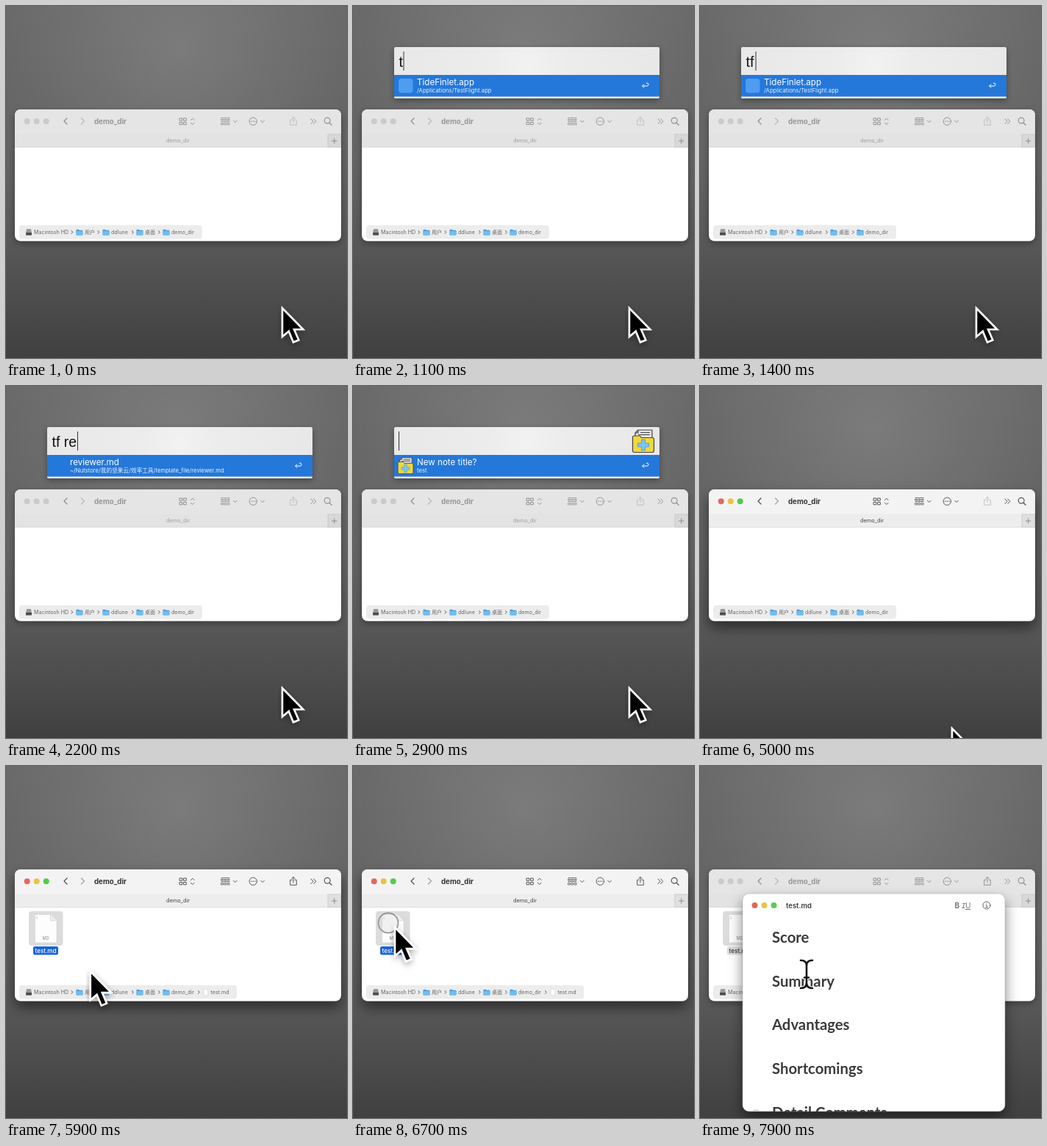
Animation of 464 by 480 pixels, one loop 8 s. Source, as an HTML page:

```html
<!DOCTYPE html>
<html lang="en">
<head>
<meta charset="utf-8">
<title>Template file demo</title>
<style>
html, body { margin: 0; width: 100%; height: 100%; overflow: hidden; background: #555; }
svg { display: block; width: 100vw; height: 100vh; }
text { font-family: Inter, "Noto Sans CJK SC", "Noto Sans CJK", sans-serif; white-space: pre; }
.line { fill: none; stroke: currentColor; stroke-linecap: round; stroke-linejoin: round; }
.path text { font-size: 7.1px; fill: #666; }
.doc text { fill: #3b3b3b; }
.doc .head { font: 700 20.3px Lato, sans-serif; }
</style>
</head>
<body>
<svg viewBox="0 0 464 480" xmlns="http://www.w3.org/2000/svg">
  <defs>
    <linearGradient id="wall" x2="0" y2="1">
      <stop offset="0" stop-color="#696969"/>
      <stop offset=".45" stop-color="#636363"/>
      <stop offset=".7" stop-color="#565656"/>
      <stop offset="1" stop-color="#404040"/>
    </linearGradient>
    <radialGradient id="glow" gradientUnits="userSpaceOnUse" cx="235" cy="60" r="250">
      <stop offset="0" stop-color="#fff" stop-opacity=".13"/>
      <stop offset="1" stop-color="#fff" stop-opacity="0"/>
    </radialGradient>
    <radialGradient id="bar" gradientUnits="userSpaceOnUse" cx="236" cy="80" r="180">
      <stop offset="0" stop-color="#f2f2f2"/>
      <stop offset=".3" stop-color="#ececec"/>
      <stop offset="1" stop-color="#e8e8e8"/>
    </radialGradient>
    <filter id="soft" x="-20%" y="-30%" width="140%" height="180%">
      <feDropShadow dx="0" dy="3" stdDeviation="4" flood-opacity=".35"/>
    </filter>
    <filter id="deep" x="-20%" y="-30%" width="140%" height="180%">
      <feDropShadow dx="0" dy="9" stdDeviation="9" flood-opacity=".5"/>
    </filter>
    <clipPath id="frame"><rect x="12" y="141" width="444" height="179.5" rx="8"/></clipPath>
    <clipPath id="page"><rect x="58" y="174" width="357" height="297" rx="9"/></clipPath>
    <g id="folder">
      <path d="M0 1.2q0-1 1-1h2.4l1 1.1H8q1 0 1 1V7q0 1-1 1H1Q0 8 0 7z" fill="#4a9edb"/>
      <rect y="2.4" width="9" height="5.6" rx=".9" fill="#6fbdf0"/>
    </g>
    <g id="noteIcon" stroke="#444" stroke-width="1.2" stroke-linejoin="round">
      <path d="M5 12V5l4-4h19v11z" fill="#e4e4e4"/>
      <path d="M9 1v4H5M12 4.500h13M9 7.500h16" fill="none"/>
      <path d="M1.500 11q0-2 2-2h8l2 2.500h15q2 0 2 2V29q0 2.500-2.500 2.500H4Q1.500 31.500 1.500 29z" fill="#f0d83a"/>
      <path d="M13.500 14h5v5h5v5h-5v5h-5v-5h-5v-5h5z" fill="#7cc4f4" stroke="#5597c4" stroke-width=".8"/>
    </g>
  </defs>

  <rect width="464" height="480" fill="url(#wall)"/>
  <rect width="464" height="480" fill="url(#glow)"/>

  <g id="finder">
    <rect id="shell" x="12" y="141" width="444" height="179.500" rx="8" fill="#fff"/>
    <g clip-path="url(#frame)">
      <rect id="toolbar" x="12" y="141" width="444" height="34"/>
      <rect id="tabs" x="12" y="174.500" width="444" height="18"/>
      <path d="M12 192.500h444" stroke="#d6d6d6" stroke-width=".8"/>
      <rect id="plusBox" x="438" y="175" width="18" height="17.500" stroke="#c4c4c4" stroke-width=".7"/>
      <path d="M443.500 184h6.500M446.750 180.750v6.500" class="line" color="#858585" stroke-width=".9"/>
    </g>
    <g id="lights"></g>
    <text id="title" x="120" y="160.800" font-size="9.700" font-weight="700">demo_dir</text>
    <text id="tabName" x="234" y="186.300" font-size="7.300" text-anchor="middle">demo_dir</text>
    <g id="tools" class="line" stroke-width="1">
      <path d="M83 153l-4 4 4 4" stroke-width="1.300"/>
      <path d="M102.500 153l4 4-4 4" stroke-width="1.300" opacity=".5"/>
      <path d="M236.500 153h3.300v3.300h-3.300zM242 153h3.300v3.300h-3.300zM236.500 158.500h3.300v3.300h-3.300zM242 158.500h3.300v3.300h-3.300z"/>
      <path d="M251.500 155.500l2.300-2.300 2.300 2.300M251.500 159.300l2.300 2.300 2.300-2.300"/>
      <path d="M293 152.500h11M293 157.500h11" stroke-width=".8"/>
      <path d="M293 154.300h2.400v1.700h-2.400zM297.300 154.300h2.400v1.700h-2.400zM301.600 154.300h2.400v1.700h-2.400zM293 159.500h2.400v2.500h-2.400zM297.300 159.500h2.400v2.500h-2.400zM301.600 159.500h2.400v2.500h-2.400z" stroke-width=".8"/>
      <path d="M309.500 156.300l2.300 2.300 2.300-2.300M346.800 156.300l2.300 2.300 2.300-2.300"/>
      <circle cx="336.300" cy="157.300" r="5.200"/>
      <path d="M333.800 157.300h.1M336.300 157.300h.1M338.800 157.300h.1" stroke-width="1.400"/>
      <path d="M415 154l3 3.300-3 3.300M418.800 154l3 3.300-3 3.300"/>
      <circle cx="437.200" cy="156.300" r="3.900" stroke-width="1.200"/>
      <path d="M440.100 159.300l3 3" stroke-width="1.300"/>
    </g>
    <path id="share" class="line" d="M389 155.300h-2.300v7h8.600v-7H393M391 159v-7.500M388.800 153.500l2.200-2.200 2.200 2.200"/>

    <g id="file">
      <rect x="31" y="198" width="46.500" height="47" rx="4" fill="#dcdcdc"/>
      <path d="M39.500 202.500h21l8.500 8.500v30H39.500z" fill="#fdfdfd" stroke="#d0d0d0" stroke-width=".6"/>
      <path d="M60.500 202.500v8.500H69" fill="#eee" stroke="#ccc" stroke-width=".6"/>
      <path d="M42 205v4" stroke="#aaa" stroke-width=".6"/>
      <text x="54" y="237.300" font-size="5.600" text-anchor="middle" fill="#888">MD</text>
      <rect id="labelBox" x="37" y="246" width="34" height="11.500" rx="2.200"/>
      <text id="label" x="54" y="254.500" font-size="8" font-weight="500" text-anchor="middle">test.md</text>
    </g>

    <g class="path">
      <rect id="crumbs" x="18" y="299" height="18.500" rx="4" fill="#ececec"/>
      <path d="M28.200 304h5.600l1.200 5v3.500h-8V309z" fill="#999"/>
      <rect x="27" y="309" width="8" height="3.500" rx=".7" fill="#4d4d4d"/>
      <g id="trail"></g>
      <g id="leaf">
        <path d="M261.500 306.500l1.800 1.900-1.800 1.900" class="line" color="#555"/>
        <path d="M269 304h4l2 2v7h-6z" fill="#fafafa" stroke="#c8c8c8" stroke-width=".5"/>
        <text x="278.500" y="311">test.md</text>
      </g>
    </g>
  </g>

  <g id="launcher">
    <rect id="panel" x="56" y="56" width="361" rx="2" fill="url(#bar)" filter="url(#soft)"/>
    <text id="query" x="62.500" y="83" style="font:19.500px 'Liberation Sans',sans-serif" fill="#111"></text>
    <path id="caret" stroke="#333" stroke-width="1"/>
    <g id="row">
      <rect x="56" y="94" width="361" height="29.500" fill="#2478da"/>
      <rect id="appIcon" x="62" y="99" width="19.500" height="19.500" rx="4" fill="#4f9cf0"/>
      <use id="smallIcon" href="#noteIcon" transform="translate(60 97) scale(.72)"/>
      <text id="rowTitle" x="87" y="108.300" font-size="11.600" fill="#fff"></text>
      <text id="rowSub" x="87" y="117.800" font-size="7.700" fill="#e8f1fc"></text>
      <path class="line" color="#fff" d="M396 106.800l-2.300 2.300 2.300 2.300M394 109.100h6q2 0 2-2t-2-2h-.6"/>
    </g>
    <use id="bigIcon" href="#noteIcon" transform="translate(379 59)"/>
  </g>

  <g id="doc" class="doc">
    <rect x="58" y="174" width="357" height="297" rx="9" fill="#fff" filter="url(#deep)"/>
    <rect x="58" y="174" width="357" height="297" rx="9" fill="#fff" stroke="#aaa" stroke-width=".5"/>
    <g id="docLights"></g>
    <text x="117" y="193.700" font-size="9.500" font-weight="600">test.md</text>
    <text x="346.500" y="194" font-size="10" font-weight="700" style="fill:#777">B</text>
    <text x="355.500" y="194" style="font:italic 10.500px 'Liberation Mono',monospace;fill:#777">I</text>
    <text x="361" y="194" font-size="10" text-decoration="underline" style="fill:#777">U</text>
    <g class="line" color="#666">
      <circle cx="390" cy="190" r="5"/>
      <path d="M390 187.500v.1M389.300 189.500h.8v3M388.800 192.700h2.600"/>
    </g>
    <g id="headings" clip-path="url(#page)"></g>
    <path d="M72 469.500h8" stroke="#bbb"/>
  </g>

  <circle id="ring" cx="48" cy="214" r="13.500" fill="#ddd" fill-opacity=".4" stroke="#999" stroke-width="1.800"/>
  <g id="arrow">
    <path d="M0 0V39L8.800 31.500 15 46.500 22.300 43.500 16 29H28.300Z" fill="#000" stroke="#fff" stroke-width="2.600" filter="url(#soft)"/>
  </g>
  <g id="beam" fill="none" stroke-linecap="round">
    <path id="beamEdge" stroke="#fff" stroke-width="5"/>
    <path id="beamCore" stroke="#111" stroke-width="2.600"/>
  </g>
</svg>
<script>
const LOOP = 8000, STEP = 100;
const $ = id => document.getElementById(id);
const set = (id, attrs) => {
  for (const key in attrs) $(id).setAttribute(key, attrs[key]);
};
const show = (id, on) => set(id, { display: on ? 'inline' : 'none' });
const ease = p => p * p * (3 - 2 * p);

const LIGHTS = ['#e1695f', '#e5c544', '#51cb4d'];
const dots = (x, y, colors) => colors.map((color, i) =>
  `<circle cx="${x + i * 13}" cy="${y}" r="4" fill="${color}"/>`).join('');

// Name, text x and chevron x for each crumb.
const CRUMBS = [
  ['Macintosh HD', 38, 89], ['用户', 107, 125], ['ddlune', 143, 171.5],
  ['桌面', 189, 207.5], ['demo_dir', 225, 0]
];
$('trail').innerHTML = CRUMBS.map(([name, x, arrow], i) =>
  (i ? `<use href="#folder" x="${x - 11.5}" y="304.500"/>` : '') +
  `<text x="${x}" y="311">${name}</text>` +
  (arrow ? `<path class="line" color="#555" d="M${arrow} 306.500l1.800 1.900-1.800 1.900"/>` : '')
).join('');

$('headings').innerHTML = ['Score', 'Summary', 'Advantages', 'Shortcomings', 'Detail Comments']
  .map((name, i) => `<text class="head" x="98" y="${241 + i * 59.7}">${name}</text>`).join('');
$('docLights').innerHTML = dots(74.5, 190, ['#d9685f', '#e2c64c', '#57cd52']);

const BEAM = 'M-8-19Q0-19 0-12V12Q0 19-8 19M8-19Q0-19 0-12M0 12Q0 19 8 19M-3 4.500H3';
set('beamEdge', { d: BEAM });
set('beamCore', { d: BEAM });

const APP = ['TideFinlet.app', '/Applications/TestFlight.app'];
const REVIEW = ['reviewer.md', '~/Nutstore/我的坚果云/效率工具/template_file/reviewer.md'];
const NOTE = ['New note title?', 'test'];
// Start time, typed text, caret x, result row.
const TYPING = [
  [700, '', 62.5, null], [1100, 't', 69, APP], [1300, 'tf', 76, APP],
  [1700, 'tf ', 80.5, REVIEW], [1900, 'tf r', 87, REVIEW], [2100, 'tf re', 97.5, REVIEW],
  [2700, '', 62.5, NOTE], [3300, 't', 69, NOTE], [3500, 'te', 79.5, NOTE],
  [3600, 'tes', 89, NOTE], [3800, 'test', 94.5, NOTE]
];
const CLOSE = 4200, REVEAL = 5400, OPEN = 7000;

// Time, x, y of the pointer.
const POINTER = [
  [0, 376, 412], [4700, 376, 412], [5000, 343, 467], [5300, 280, 452],
  [6200, 57, 220], [7000, 57, 220], [7500, 145, 284], [LOOP, 145, 284]
];
function pointerAt(t) {
  const i = POINTER.findIndex(([time]) => time > t);
  const [t0, x0, y0] = POINTER[i - 1], [t1, x1, y1] = POINTER[i];
  const p = ease((t - t0) / (t1 - t0));
  return [x0 + (x1 - x0) * p, y0 + (y1 - y0) * p];
}

function drawFinder(t) {
  const active = t >= CLOSE && t < OPEN, chosen = t >= REVEAL;
  set('shell', { filter: `url(#${active ? 'deep' : 'soft'})` });
  set('toolbar', { fill: active ? '#f4f3f4' : '#e5e5e5' });
  set('tabs', { fill: active ? '#eeedee' : '#e3e3e3' });
  set('plusBox', { fill: active ? '#e0e0e0' : '#d8d8d8' });
  set('title', { fill: active ? '#333' : '#979797' });
  set('tabName', { fill: active ? '#444' : '#a0a0a0' });
  set('tools', { color: active ? '#555' : '#919191' });
  set('share', { color: chosen ? (active ? '#555' : '#919191') : '#c0c0c0' });
  $('lights').innerHTML = dots(28.7, 157.3, active ? LIGHTS : Array(3).fill('#cbcbcb'));
  show('file', chosen);
  show('leaf', chosen);
  set('labelBox', { fill: active ? '#1c65d4' : '#dcdcdc' });
  set('label', { fill: active ? '#fff' : '#333' });
  set('crumbs', { width: chosen ? 296 : 249 });
}

function drawLauncher(t) {
  const entry = TYPING.filter(([time]) => time <= t).pop();
  const open = !!entry && t < CLOSE;
  show('launcher', open);
  if (!open) return;
  const [, text, caretX, result] = entry;
  set('panel', { height: result ? 70 : 38 });
  $('query').textContent = text;
  set('caret', { d: `M${caretX} 62v26` });
  show('row', result);
  show('appIcon', result === APP);
  show('smallIcon', result === NOTE);
  show('bigIcon', result === NOTE);
  if (result) [$('rowTitle').textContent, $('rowSub').textContent] = result;
}

function drawPointer(t) {
  const place = { transform: `translate(${pointerAt(t)})` };
  const overText = t >= 7300;
  set('arrow', place);
  set('beam', place);
  show('arrow', !overText);
  show('beam', overText);
  show('ring', t >= 6500 && t < 6800);
}

function drawDoc(t) {
  const p = Math.min(1, Math.max(0, (t - OPEN) / 300));
  const scale = .8 + .2 * ease(p);
  show('doc', p > 0);
  set('doc', {
    opacity: p,
    transform: `translate(236.500 322.500) scale(${scale}) translate(-236.500 -322.500)`
  });
}

function render(now) {
  const t = Math.floor(now % LOOP / STEP) * STEP;
  drawFinder(t);
  drawLauncher(t);
  drawDoc(t);
  drawPointer(t);
}

const start = performance.now();
function tick() {
  render(performance.now() - start);
  requestAnimationFrame(tick);
}
tick();
</script>
</body>
</html>
```
